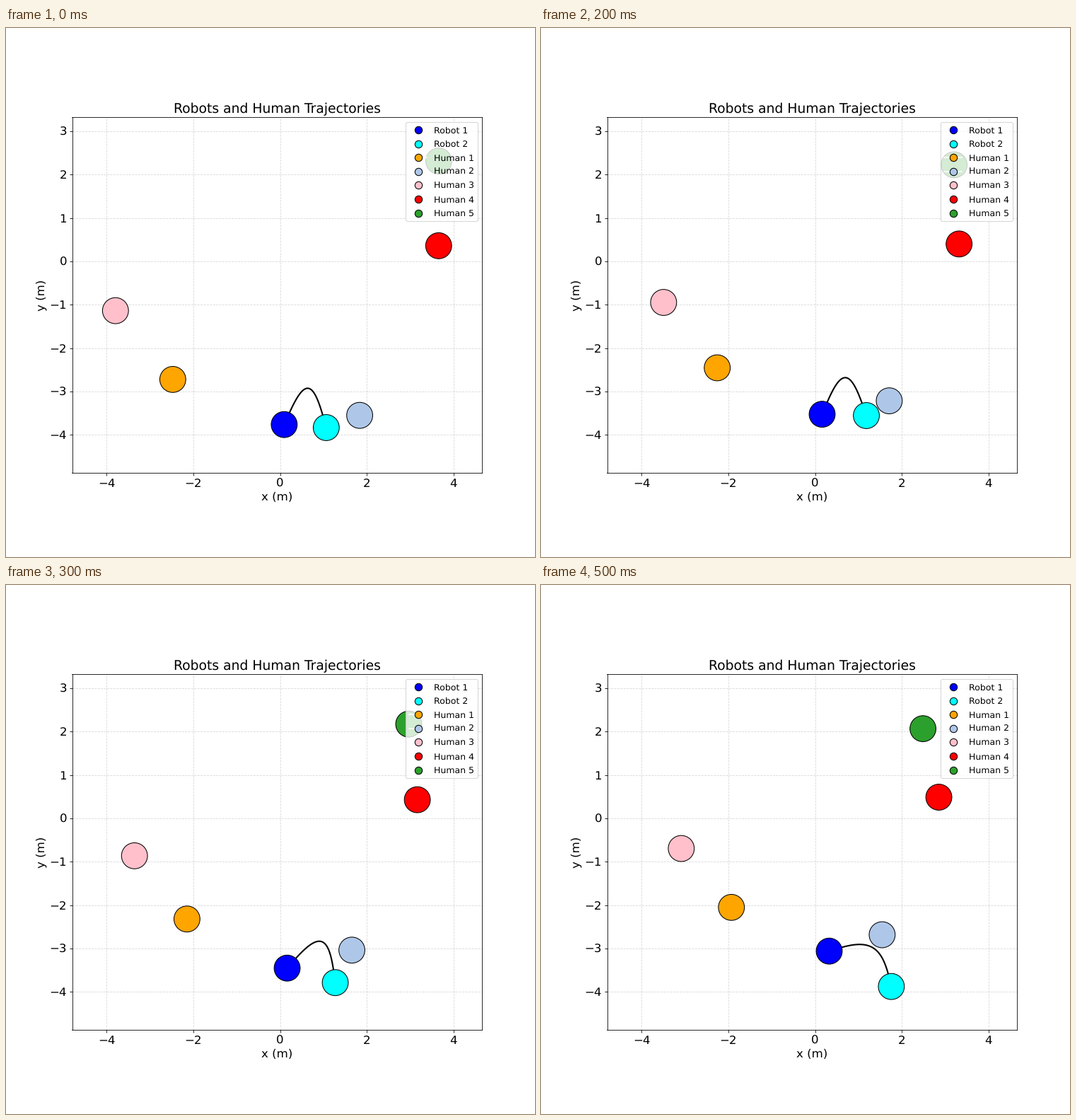
A matplotlib script for the animation above (0.6 s loop, 748x748 px).

```python
import matplotlib.pyplot as plt
import numpy as np
from matplotlib.animation import FuncAnimation
from matplotlib.lines import Line2D

plt.rcParams.update({"font.family": "DejaVu Sans", "text.hinting": "no_hinting"})

STEPS = 6
RADIUS = 0.3
CABLE_LENGTH = 2.0
LEGEND_SIZE = 12

COLORS = {"Robot 1": "blue", "Robot 2": "cyan", "Human 1": "orange",
          "Human 2": "#aec7e8", "Human 3": "pink", "Human 4": "red",
          "Human 5": "#2ca02c"}

# Waypoints in metres, keyed by step; agents walk straight between them
PATHS = {
    "Robot 1": {0: (0.095, -3.764), 1: (0.163, -3.598), 3: (0.163, -3.454),
                4: (0.232, -3.291), 5: (0.326, -3.062)},
    "Robot 2": {0: (1.065, -3.834), 2: (1.183, -3.557), 3: (1.273, -3.789),
                4: (1.526, -3.789), 5: (1.759, -3.878)},
    "Human 1": {0: (-2.475, -2.723), 5: (-1.930, -2.053)},
    "Human 2": {0: (1.836, -3.552), 1: (1.765, -3.394), 5: (1.547, -2.684)},
    "Human 3": {0: (-3.797, -1.137), 1: (-3.630, -1.031), 5: (-3.087, -0.695)},
    "Human 4": {0: (3.658, 0.361), 1: (3.477, 0.372), 5: (2.855, 0.489)},
    "Human 5": {0: (3.660, 2.314), 1: (3.447, 2.281), 5: (2.488, 2.069)},
}


def position(label, step):
    path = PATHS[label]
    xs, ys = zip(*path.values())
    return np.array([np.interp(step, list(path), xs), np.interp(step, list(path), ys)])


def cable_curve(start, end, samples=80):
    """Half sine wave over the chord, as tall as the slack cable folded in two."""
    chord = end - start
    span = np.hypot(*chord)
    height = np.sqrt(max(CABLE_LENGTH**2 - span**2, 0)) / 2
    normal = np.array([-chord[1], chord[0]]) / span
    s = np.linspace(0, 1, samples)
    return start[:, None] + np.outer(chord, s) + np.outer(normal, height * np.sin(np.pi * s))


def legend_marker(label, color):
    return Line2D([0], [0], marker="o", color="w", label=label, markersize=10,
                  markerfacecolor=color, markeredgecolor="black")


fig, ax = plt.subplots(figsize=(10, 10), dpi=74.8)
ax.set_aspect("equal")
ax.set_xlim(-4.797, 4.660)
ax.set_ylim(-4.880, 3.322)
ax.set_xticks(range(-4, 5, 2))
ax.set_yticks(range(-4, 4))
ax.tick_params(labelsize=16)
ax.set_xlabel("x (m)", fontsize=16)
ax.set_ylabel("y (m)", fontsize=16)
ax.set_title("Robots and Human Trajectories", fontsize=18)
ax.grid(True, linestyle="--", alpha=0.5)

cable, = ax.plot([], [], color="black", linewidth=2, zorder=2.5)
discs = {}
for label, color in COLORS.items():
    discs[label] = plt.Circle(position(label, 0), RADIUS, facecolor=color,
                              edgecolor="black", zorder=3)
    ax.add_patch(discs[label])

legend = ax.legend(handles=[legend_marker(*item) for item in COLORS.items()],
                   loc="upper right", fontsize=LEGEND_SIZE, handleheight=1.27)
for handle in legend.legend_handles:
    # Centre the markers on the capitals despite the taller rows
    handle.set_ydata(np.full(len(handle.get_xdata()), 0.35 * LEGEND_SIZE))


def update(step):
    for label, disc in discs.items():
        disc.center = position(label, step)
    cable.set_data(*cable_curve(position("Robot 1", step), position("Robot 2", step)))
    return [cable, *discs.values()]


anim = FuncAnimation(fig, update, frames=STEPS, interval=100, repeat=True,
                     init_func=lambda: update(0))
plt.show()
```
